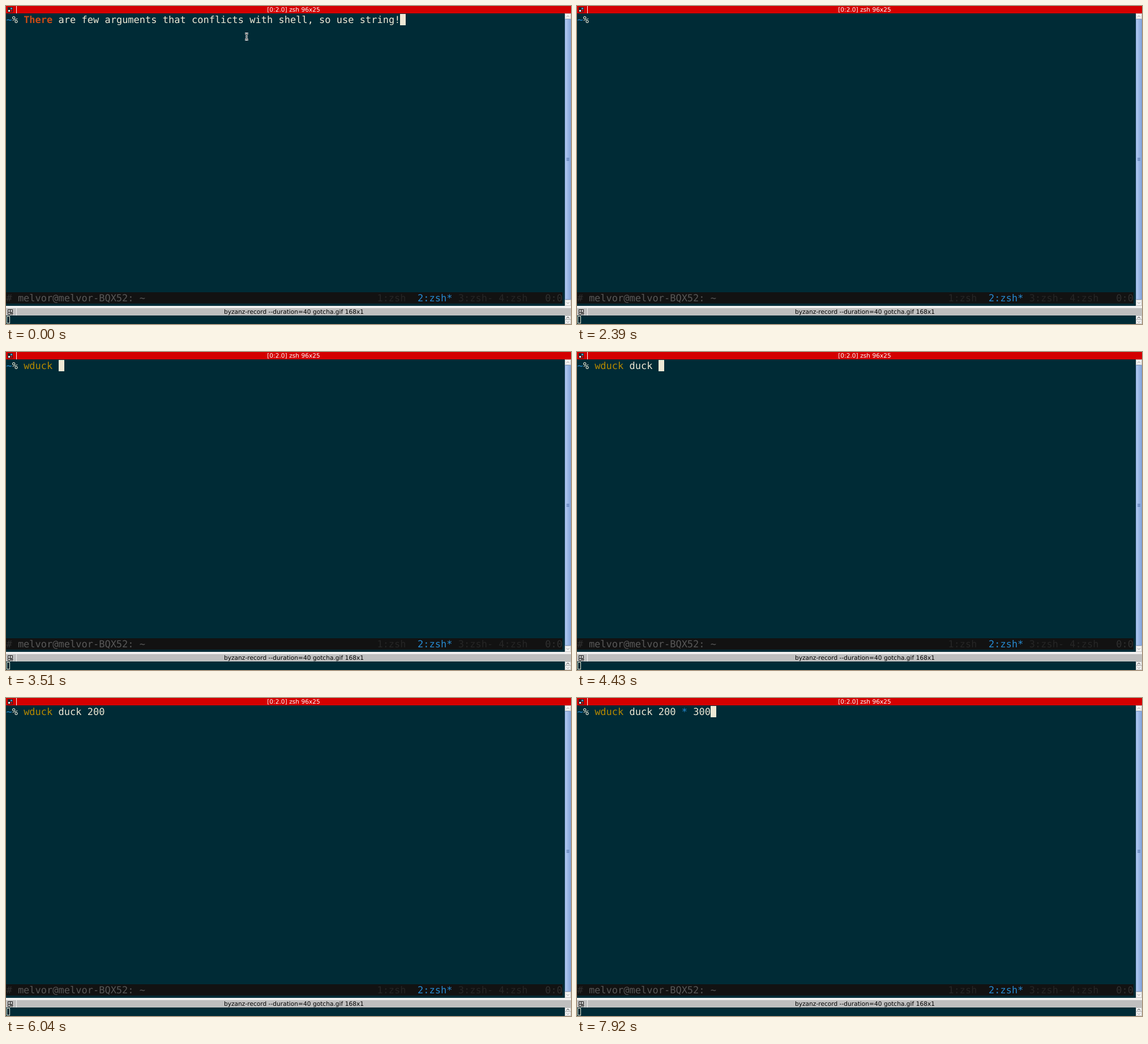
Write an HTML page that moves like this. It is 998 px wide and 561 px high and loops after 8000 ms.

```html
<!DOCTYPE html>
<html lang="en">
<head>
<meta charset="utf-8">
<title>Terminal</title>
<style>
  html, body { margin: 0; width: 100%; height: 100%; overflow: hidden; background: #002b36; }
  svg { display: block; width: 998px; height: 561px; }
  text { white-space: pre; text-rendering: geometricPrecision; }
  .mono { font: 17px "DejaVu Sans Mono", monospace; fill: #eee8d5; }
  .ui { font: 10.65px "DejaVu Sans", sans-serif; text-anchor: middle; }
  .blue { fill: #268bd2; }
  .known { fill: #b58900; }
  .unknown { fill: #cb4b16; font-weight: bold; }
  .prefix { text-decoration: underline; }
  .dim { fill: #262626; }
</style>
</head>
<body>
<svg viewBox="0 0 998 561">
  <defs>
    <linearGradient id="thumb">
      <stop offset="0" stop-color="#b4cbf2"/>
      <stop offset="1" stop-color="#83a5dc"/>
    </linearGradient>
  </defs>
  <rect width="998" height="561" fill="#002b36"/>

  <!-- upper title bar -->
  <rect width="998" height="13" fill="#d40000"/>
  <rect x="18" width="1" height="13" fill="#fff"/>
  <g shape-rendering="crispEdges">
    <rect x="3" y="2" width="9" height="9" fill="#24262b"/>
    <rect x="8" y="3" width="3" height="3" fill="#4a90b8"/>
    <rect x="4" y="7" width="3" height="3" fill="#eee"/>
    <rect x="8" y="7" width="3" height="3" fill="#d40000"/>
  </g>
  <text class="ui" x="508" y="10" fill="#fff">[0:2.0] zsh 96x25</text>

  <!-- scrollbar -->
  <rect x="987" y="13" width="11" height="516" fill="#d9d9d9"/>
  <rect x="987.5" y="13.5" width="10" height="9" fill="#f4f4f4" stroke="#c4c4c4"/>
  <rect x="987.5" y="518.5" width="10" height="10" fill="#f4f4f4" stroke="#c4c4c4"/>
  <rect x="987.5" y="23.5" width="10" height="494" fill="url(#thumb)" stroke="#7d9ccc"/>
  <path d="M990 19.5l2.5-2.500 2.500 2.500M990 522.500l2.500 2.500 2.500-2.500" fill="none" stroke="#999"/>
  <path d="M990 268.500h5m-5 2h5m-5 2h5" stroke="#5476b0"/>

  <!-- status line -->
  <rect y="505" width="983" height="20" fill="#121212"/>
  <text class="mono" x="0.4" y="521"><tspan fill="#303030"># </tspan><tspan fill="#585858">melvor@melvor-BQX52: ~</tspan></text>
  <text class="mono dim" x="655.4" y="521">1:zsh  <tspan class="blue">2:zsh*</tspan> 3:zsh- 4:zsh   <tspan fill="#303030">0:0</tspan></text>

  <!-- lower pane -->
  <rect y="529" width="998" height="4" fill="#f2f1f0"/>
  <rect y="533" width="998" height="13" fill="#bfbfbf"/>
  <rect x="18" y="533" width="1" height="13" fill="#f2f1f0"/>
  <path d="M3.500 535.500h8v5h-8zm0 5v4h4v-9m1 7h4m-2-2v5" fill="none" stroke="#222"/>
  <text class="ui" x="508.500" y="543">byzanz-record --duration=40 gotcha.gif 168x1</text>
  <rect x="1.500" y="547.500" width="5" height="12" fill="none" stroke="#eee8d5"/>
  <rect x="987.500" y="546.500" width="10" height="6" fill="#f4f4f4" stroke="#c4c4c4"/>
  <rect x="987.500" y="553.500" width="10" height="7" fill="#f4f4f4" stroke="#c4c4c4"/>
  <path d="M990 551l2.500-2.500 2.500 2.500" fill="none" stroke="#222"/>
  <path d="M990 556l2.500 2.500 2.500-2.500" fill="none" stroke="#999"/>

  <!-- prompt -->
  <rect id="cursor" y="14" width="10" height="20" fill="#eee8d5"/>
  <text class="mono" x="0.4" y="30"><tspan class="blue">~</tspan>% <tspan id="command"></tspan><tspan id="args"></tspan><tspan id="star" class="blue"></tspan><tspan id="tail"></tspan></text>
  <g id="pointer" fill="none">
    <path d="M422 48.500h2l1 1 1-1h2M425 49v10M422 59.500h2l1-1 1 1h2" stroke="#fff" stroke-width="3"/>
    <path d="M422 48.500h2l1 1 1-1h2M425 49v10M422 59.500h2l1-1 1 1h2" stroke="#111"/>
  </g>
</svg>
<script>
const LOOP = 8000, CELL = 17 * 0.602, LEFT = 0.4;
const INTRO = "There are few arguments that conflicts with shell, so use string!";
const KNOWN = ["w", "wduck"];

// [start in ms, typed line, cursor shown]
const steps = [
  [0, INTRO, true], [200, INTRO, false], [810, INTRO, true], [1410, INTRO, false],
  [1830, "", true], [2390, "", false],
  [2840, "w", true], [3050, "wd", true], [3150, "wdu", true],
  [3260, "wduc", true], [3380, "wduck", true], [3510, "wduck ", true],
  [3660, "wduck d", true], [3760, "wduck du", true], [3910, "wduck duc", true],
  [4300, "wduck duck", true], [4430, "wduck duck ", true], [4990, "wduck duck ", false],
  [5120, "wduck duck 2", true], [5320, "wduck duck 20", true], [5480, "wduck duck 200", true],
  [6040, "wduck duck 200", false], [6640, "wduck duck 200", true],
  [6830, "wduck duck 200 ", true], [7130, "wduck duck 200 *", true],
  [7290, "wduck duck 200 * ", true], [7450, "wduck duck 200 * 3", true],
  [7580, "wduck duck 200 * 30", true], [7920, "wduck duck 200 * 300", true]
];

const [command, args, star, tail, cursor, pointer] =
  ["command", "args", "star", "tail", "cursor", "pointer"].map(id => document.getElementById(id));
let shown = null;

function showLine(line) {
  const [, word, rest, glob, end] = line.match(/^(\S*)([^*]*)(\*?)(.*)$/);
  command.textContent = word;
  command.setAttribute("class", KNOWN.includes(word) ? "known" : "unknown");

  // A partial path match is underlined while it is being typed.
  const prefix = rest.match(/ (2|20)$/);
  args.textContent = prefix ? rest.slice(0, -prefix[1].length) : rest;
  star.textContent = glob;
  tail.textContent = prefix ? prefix[1] : end;
  tail.setAttribute("class", prefix ? "prefix" : "");
  cursor.setAttribute("x", Math.round(LEFT + (3 + line.length) * CELL));
}

function render(t) {
  const step = steps.findLast(([start]) => start <= t);
  if (step !== shown) {
    showLine(step[1]);
    cursor.style.display = step[2] ? "" : "none";
    shown = step;
  }
  pointer.style.display = t < 1790 ? "" : "none";
}

const origin = performance.now();
function tick() {
  render((performance.now() - origin) % LOOP);
  requestAnimationFrame(tick);
}
tick();
</script>
</body>
</html>
```
